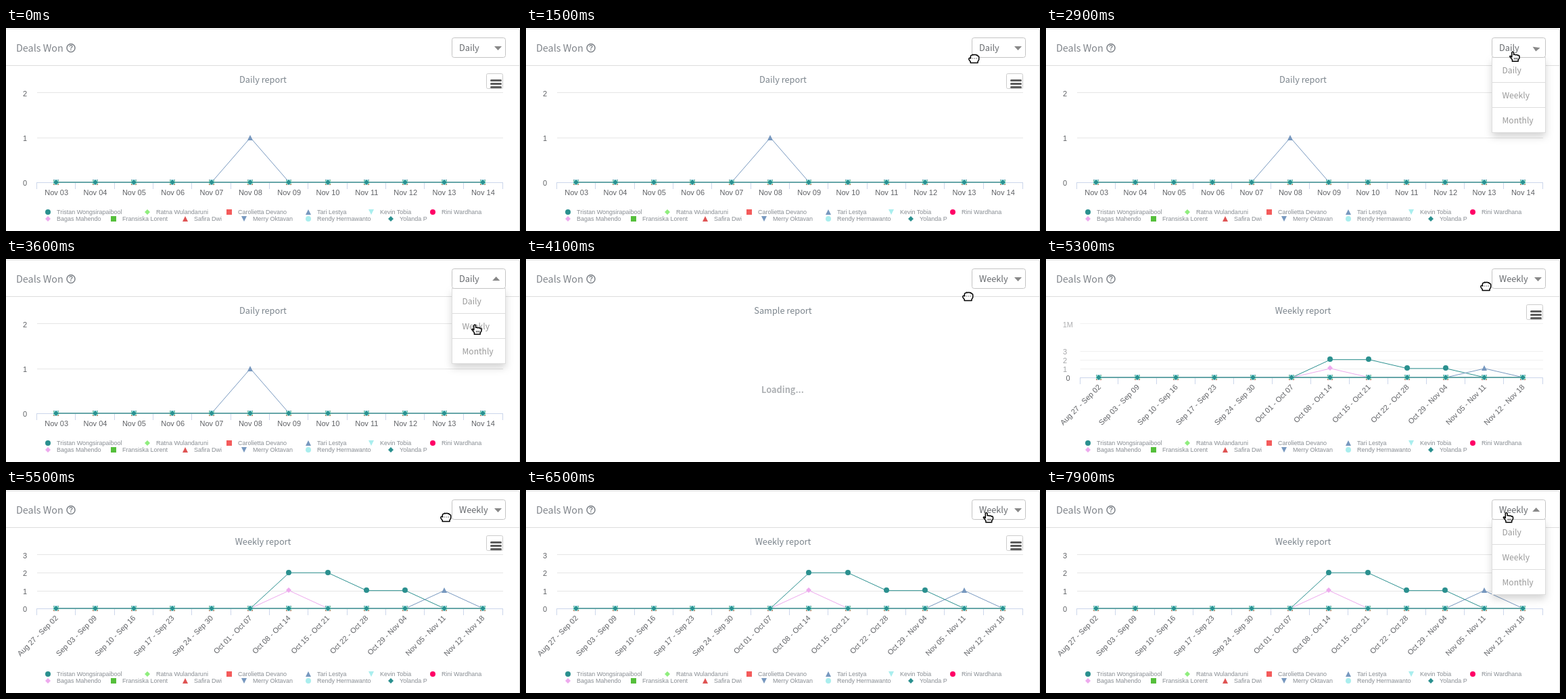
An HTML page that plays this animation: 760 by 300 pixels, repeating every 8 s.

```html
<!DOCTYPE html>
<html lang="en">
<head>
<meta charset="utf-8">
<title>Deals Won</title>
<style>
  html, body { margin: 0; width: 760px; height: 300px; overflow: hidden; background: #fff; }
  svg { display: block; }
  text { white-space: pre; }
  .ui { font: 12.75px "Noto Sans CJK SC", "Noto Sans CJK JP", "Noto Sans CJK", "Open Sans", sans-serif; }
  .head { font-size: 14.35px; fill: #80858b; }
  .title { fill: #7b848c; text-anchor: middle; }
  .wait { font-weight: 700; fill: #aeb1b4; text-anchor: middle; }
  .pick { fill: #66696d; }
  .item { font-size: 12.1px; font-weight: 300; fill: #999; }
  .axis { font: 11px "Liberation Sans", Arial, sans-serif; fill: #606266; }
  .legend { font: 9px "Liberation Sans", Arial, sans-serif; fill: #888d93; }
  .menu { filter: drop-shadow(0 6px 6px rgba(0, 0, 0, .175)); }
</style>
</head>
<body>
<svg width="760" height="300" viewBox="0 0 760 300">
  <rect x="-6" y="1.5" width="765.5" height="320" rx="3" fill="#fff" stroke="#ddd"/>
  <path d="M0 55.5H759" stroke="#ddd"/>
  <text class="ui head" x="15" y="35">Deals Won</text>
  <circle cx="96" cy="29.5" r="6" fill="none" stroke="#7c8187" stroke-width="1.5"/>
  <text x="96" y="33.2" text-anchor="middle" font-family="Liberation Sans, Arial, sans-serif" font-weight="700" font-size="10" fill="#7c8187">?</text>
  <g id="chart"></g>
  <g id="picker"></g>
  <g id="cursor"></g>
</svg>
<script>
const LOOP = 8000, STEP = 100, TOP = 96, RIGHT = 734;
const $ = id => document.getElementById(id);
const COLORS = ['#2b908f', '#90ee7e', '#f45b5b', '#7798bf', '#aaeeee', '#ff0066',
  '#eeaaee', '#55bf3b', '#df5353', '#7798bf', '#aaeeee', '#2b908f'];
const NAMES = ['Tristan Wongsirapaibool', 'Ratna Wulandaruni', 'Carolietta Devano', 'Tari Lestya',
  'Kevin Tobia', 'Rini Wardhana', 'Bagas Mahendo', 'Fransiska Lorent', 'Safira Dwi',
  'Merry Oktavan', 'Rendy Hermawanto', 'Yolanda P'];
const LEGEND_X = [62, 209, 330, 447, 540, 631, 62, 159, 265, 352, 447, 569];
const DAYS = NAMES.map((_, i) => 'Nov ' + String(i + 3).padStart(2, '0'));
const WEEKS = weekLabels();

// Non-zero values: series -> { category: value }
const DAILY = { 3: { 5: 1 } };
const WEEKLY = { 0: { 6: 2, 7: 2, 8: 1, 9: 1 }, 3: { 10: 1 }, 6: { 6: 1 } };

// Cursor stops: time, x, y
const PATH = [
  [1000, 586, 8], [1200, 625, 32], [1300, 643, 41], [1400, 650, 42.5], [1500, 654, 38.5],
  [1600, 664, 36], [1700, 675, 35], [1800, 681, 36], [1900, 681.5, 35], [2000, 681.5, 35],
  [2200, 685, 34], [2900, 685, 34], [3100, 686, 48], [3400, 688, 88], [3600, 688, 96],
  [3700, 688, 96], [3900, 674, 82], [4100, 645, 48.5], [4300, 643.5, 35], [4800, 643.5, 35],
  [4900, 643, 34], [5100, 643, 34], [5200, 642, 33.5], [6100, 642, 33.5],
  [6300, 658, 31], [6500, 675.5, 32.5], [8000, 675.5, 32.5]
];
const HAND = 'M4 9.5L2.6 7.6Q.8 6.8 .8 8.4L4.4 12.8V15.2H13.2V13L15 10.4V7.6Q14.4 6 12.6 6.5Q11.4 5.2 9.8 5.8Q8.4 4.8 6.6 5.3V2.2Q5.2 -.2 3.8 2.2V9';
const FIST = 'M3.2 13V11.2L1 8.4Q.2 5.6 2.6 5.8L3.4 6.4V3.2Q3.8 1.4 5.4 1.7Q6.8 .3 8.4 1.3Q10 .3 11.4 1.5Q13.2 1 13.8 2.7Q15.6 2.6 15.7 4.2V8.4L14 11.2V13Z';

function weekLabels() {
  const fmt = d => new Date(d).toLocaleDateString('en-US', { month: 'short', day: '2-digit', timeZone: 'UTC' });
  const day = 864e5, first = Date.UTC(2018, 7, 27);
  return NAMES.map((_, i) => {
    const start = first + i * 7 * day;
    return fmt(start) + ' - ' + fmt(start + 6 * day);
  });
}

const clamp = v => Math.max(0, Math.min(1, v));
const swing = p => .5 - Math.cos(Math.PI * clamp(p)) / 2;
const mix = (a, b, p) => a + (b - a) * p;
const slotX = (left, k) => left + (RIGHT - left) / 12 * k;
const line = (d, color, more = '') => `<path d="${d}" fill="none" stroke="${color}" ${more}/>`;
const text = (cls, x, y, s, more = '') => `<text class="${cls}" x="${x}" y="${y}" ${more}>${s}</text>`;

function marker(i, x, y) {
  const shapes = [
    'm-4 0a4 4 0 1 0 8 0a4 4 0 1 0 -8 0z',
    'm0 -4l4 4l-4 4l-4 -4z',
    'm-4 -4h8v8h-8z',
    'm0 -4l4 8h-8z',
    'm-4 -4h8l-4 8z'
  ];
  return `<path d="M${x} ${y}${shapes[i % 5]}" fill="${COLORS[i]}"/>`;
}

// Lines run through exact points, markers sit on whole pixels
function plot(data, left, zero, unit) {
  return NAMES.map((_, i) => {
    const pts = DAYS.map((_, k) => [slotX(left, k + .5), zero - unit * ((data[i] || {})[k] || 0)]);
    return line('M' + pts.join('L'), COLORS[i]) +
      pts.map(([x, y]) => marker(i, Math.floor(x), Math.floor(y))).join('');
  }).join('');
}

function xAxis(left, zero) {
  let d = `M${left} ${zero + .5}H${RIGHT}`;
  for (let k = 0; k <= 12; k++) d += `M${Math.round(slotX(left, k)) + (k < 12 ? -.5 : .5)} ${zero}v10`;
  return line(d, '#ccd6eb');
}

function grid(left, y, more) {
  const row = Math.round(y) + (y > TOP ? .5 : -.5);
  return line(`M${left} ${row}H${RIGHT + 1}`, '#e6e6e6', more);
}

const yLabel = (x, y, s, more = '') => text('axis', x, y + 5, s, 'text-anchor="end" ' + more);

function legend() {
  return NAMES.map((name, i) => {
    const y = i < 6 ? 272 : 282, x = LEGEND_X[i];
    return marker(i, x, y) + text('legend', x + 13, y + 3, name);
  }).join('');
}

function exportButton() {
  return '<rect x="710.5" y="67.5" width="24" height="22" rx="2" fill="#fff" stroke="#ccc"/>' +
    line('M717.5 77.5h14M717.5 82.5h14M717.5 87.5h14', '#5c5c5c', 'stroke-width="3" stroke-linecap="round"');
}

const title = s => text('ui title', 380, 81, s);

function dailyChart() {
  const left = 46, zero = 228, unit = (zero - TOP) / 2;
  let s = title('Daily report') + grid(left, TOP) + grid(left, zero - unit) + xAxis(left, zero);
  for (let v = 0; v < 3; v++) s += yLabel(31, zero - v * unit, v);
  DAYS.forEach((d, k) => s += text('axis', slotX(left, k + .5), 247, d, 'text-anchor="middle"'));
  return s + plot(DAILY, left, zero, unit) + legend() + exportButton();
}

function weeklyChart(t) {
  const e = swing((t - 5100) / 400), left = mix(55, 46, e), zero = 175;
  const unit = (zero - TOP) / 3 * e, fade = `opacity="${mix(.15, 1, e)}"`, leave = `opacity="${1 - e}"`;
  let s = title('Weekly report');
  if (e < 1) s += grid(left, TOP, leave) + yLabel(40, TOP, '1M', leave);
  for (let v = 1; v < 4; v++) {
    const y = zero - v * unit;
    s += grid(left, y, fade) + yLabel(31, y, v, fade);
  }
  s += yLabel(mix(40, 31, e), zero, 0) + xAxis(left, zero);
  WEEKS.forEach((w, k) => {
    const x = slotX(left, k + .5) + 2.8;
    s += text('axis', x, 190, w, `text-anchor="end" transform="rotate(-45 ${x} 190)"`);
  });
  return s + plot(WEEKLY, left, zero, unit) + legend() + exportButton();
}

function chart(t) {
  if (t < 3700) return dailyChart();
  if (t < 5100) return title('Sample report') + text('ui wait', 379.5, 198, 'Loading...');
  return weeklyChart(t);
}

// How far the caret has turned: -1 is at rest
function caretTurn(t) {
  if (t >= 7600) return clamp((t - 7600) / 300);
  if (t >= 2900 && t < 3700) return clamp((t - 2900) / 300);
  if (t >= 3700 && t < 4000) return 1 - (t - 3700) / 300;
  return -1;
}

function picker(t) {
  const open = t >= 7600 || (t >= 2900 && t < 3700), turn = caretTurn(t);
  const place = turn < 0 ? 'translate(727.5 30)'
    : `translate(724.7 ${mix(31.5, 29, turn)}) rotate(${mix(8, 180, turn)})`;
  let s = '';
  if (open) {
    s += '<rect class="menu" x="659.5" y="43.5" width="79" height="111" fill="#fff"/>' +
      '<rect x="659.5" y="43.5" width="79" height="111" fill="#fff" stroke="#ddd"/>' +
      line('M660 80.5H738M660 117.5H738', '#ddd');
    ['Daily', 'Weekly', 'Monthly'].forEach((n, i) => s += text('ui item', 674.5, 67 + 37 * i, n));
  }
  return s + '<rect x="659.5" y="14.5" width="79" height="29" rx="3" fill="#fff" stroke="#c4c4c4"/>' +
    text('ui pick', 670, 34, t < 3700 ? 'Daily' : 'Weekly') +
    `<path d="M-5.5 -3h11l-5.5 6z" fill="#888" transform="${place}"/>`;
}

function cursor(t) {
  if (t < PATH[0][0]) return '';
  const n = PATH.findIndex(p => p[0] > t);
  const [t0, x0, y0] = PATH[n - 1], [t1, x1, y1] = PATH[n], p = (t - t0) / (t1 - t0);
  const x = mix(x0, x1, p), y = mix(y0, y1, p), hand = x > 660;
  const details = hand
    ? line('M7.5 10v2.5M9.5 10v2.5M11.5 10v2.5', '#000', 'stroke-width=".8"')
    : line('M5.5 6.5h1M8.5 6.5h1M11.5 6.5h1', '#000');
  return `<g transform="translate(${x} ${y})"><path d="${hand ? HAND : FIST}" fill="#fff" stroke="#000" stroke-width="1.5" stroke-linejoin="round"/>${details}</g>`;
}

const PARTS = { chart, picker, cursor }, drawn = {};

function draw(t) {
  for (const id in PARTS) {
    const html = PARTS[id](t);
    if (drawn[id] !== html) $(id).innerHTML = drawn[id] = html;
  }
}

const start = performance.now();
let last = -1;
function tick() {
  const t = Math.floor((performance.now() - start) % LOOP / STEP) * STEP;
  if (t !== last) draw(last = t);
  requestAnimationFrame(tick);
}
tick();
</script>
</body>
</html>
```
